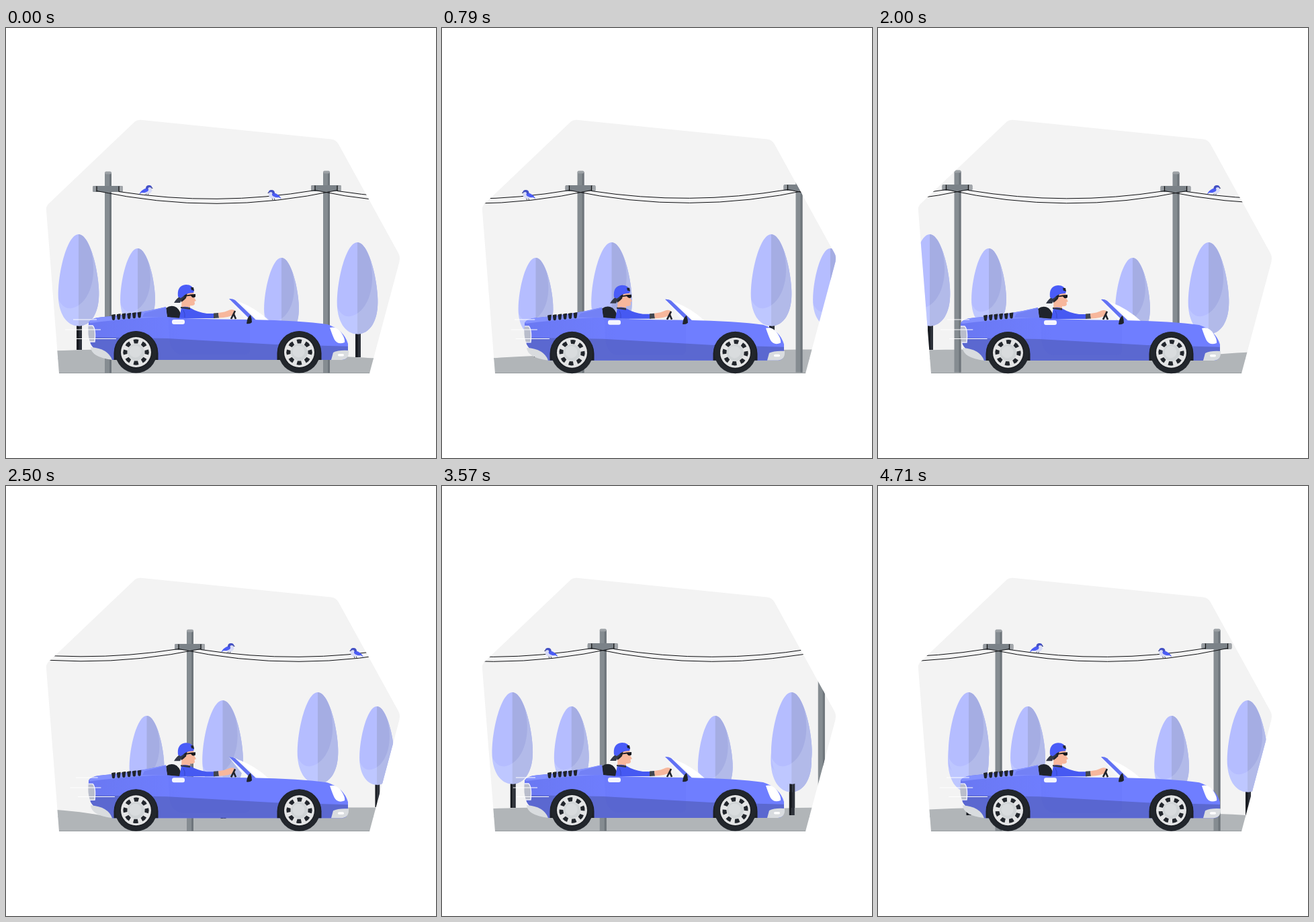
Write an HTML page with a canvas that moves like this. It is 640 px wide and 640 px high and loops after 4780 ms.

```html
<!DOCTYPE html>
<html lang="en">
<head>
<meta charset="utf-8">
<title>Country drive</title>
<style>
html, body { margin: 0; width: 100%; height: 100%; overflow: hidden; background: #fff }
canvas { display: block; width: 100vw; height: 100vh }
</style>
</head>
<body>
<canvas id="stage" width="640" height="640"></canvas>
<script>
const ctx = document.getElementById('stage').getContext('2d');
const LOOP = 4780, STEPS = 67;
const DARK = '#20242c';

// [step, scrolled distance]
const scrollKeys = [[0, 0], [11, 270.5], [21, 514], [35, 853], [43, 1043], [57, 1381.5], [66, 1597.5], [67, 1624.5]];
const groups = [0, 652.5, 1209, 1624.5];
const poleLift = [0, 1, 2, 0, 1, 0, 1];
const trees = [ // x, top, scale, trunk foot
  [523, 319, 1, 490], [108, 307, 1, 479], [196, 328, .855, 478], [410, 342, .855, 490]
];

const frame = new Path2D('M60 272Q59 265 64 261L190 141Q195 136 203 137L484 165.5Q491 166 495 173L584 335Q587 340 585.5 348L541 514H79Z');
const egg = new Path2D('M0 0C17 0 30.3 56 30.3 89C30.3 118 18 136.5 0 136.5C-18 136.5 -30.3 118 -30.3 89C-30.3 56 -17 0 0 0Z');
const eggLight = new Path2D('M14 10C33 60 16 105 -10 110C-20 112 -26 105 -31 95V138H31V10Z');
const hills = new Path2D('M-300 493C-190 484 -120 478.5 -10 478.5C60 478.5 120 482 172 493ZM145 493Q255 482 378 493Z');

function fill(shape, color) {
  ctx.fillStyle = color;
  ctx.fill(shape instanceof Path2D ? shape : new Path2D(shape));
}
function stroke(d, color, width = 1) {
  ctx.strokeStyle = color;
  ctx.lineWidth = width;
  ctx.stroke(new Path2D(d));
}
function rect(x, y, w, h, color) {
  ctx.fillStyle = color;
  ctx.fillRect(x, y, w, h);
}
function pill(x, y, w, h, r, color) {
  ctx.beginPath();
  ctx.roundRect(x, y, w, h, r);
  ctx.fillStyle = color;
  ctx.fill();
}
function disc(x, y, r, color) {
  ctx.beginPath();
  ctx.arc(x, y, r, 0, 7);
  ctx.fillStyle = color;
  ctx.fill();
}
function at(x, y, draw, sx = 1, sy = sx) {
  ctx.save();
  ctx.translate(x, y);
  ctx.scale(sx, sy);
  draw();
  ctx.restore();
}

function scrollAt(step) {
  const i = scrollKeys.findIndex(k => k[0] > step);
  const [s0, x0] = scrollKeys[i - 1], [s1, x1] = scrollKeys[i];
  return x0 + (x1 - x0) * (step - s0) / (s1 - s0);
}

function tree(x, top, scale, foot) {
  const trunkTop = top + 130 * scale, half = 4 * scale;
  rect(x - 3 * scale, trunkTop, half, foot - trunkTop, '#191c22');
  rect(x + scale, trunkTop, half, foot - trunkTop, '#2d3139');
  at(x, top, () => {
    fill(egg, '#b5bdff');
    ctx.clip(egg);
    rect(0, 0, 31, 138, '#a5ade3');
    fill(eggLight, 'rgba(224,230,255,.22)');
  }, scale);
}

function pole(x, y) {
  rect(x - 5, y - 24, 10, 299, '#858c91');
  rect(x + 2, y - 24, 3, 299, '#6e757b');
  pill(x - 5, y - 26, 10, 4, 2, '#9da2a6');
  pill(x - 23, y - 4.5, 45, 9, 2, '#7b8288');
  pill(x - 23, y - 4.5, 5, 9, 2, '#959a9f');
  pill(x + 17, y - 4.5, 5, 9, 2, '#a2a6aa');
  stroke(`M${x - 17} ${y - 4}v8M${x + 16} ${y - 4}v8`, '#111', 1.2);
}

function wire(x0, y0, x1, y1, sag) {
  const control = (y0 + y1) / 2 + 2 * sag;
  stroke(`M${x0} ${y0}Q${(x0 + x1) / 2} ${control} ${x1} ${y1}`, '#0c0d10', 1);
}

function wires([x0, y0], [x1, y1]) {
  wire(x0 + 16, y0 + 4, x1 - 17, y1 + 3, 11.8);
  wire(x0 - 17, y0 + 3, x1 + 16, y1 + 3, 19.3);
}

function bird(x, y, dir) {
  at(x, y, () => {
    stroke('M1 5L0 8M4 5L3 8', '#3b3f55', .9);
    fill('M-5 4L-2 -2L3 -5Q9 -6 9.5 -1Q9 6 2 6Z', '#d9dcf6');
    fill('M-10 6.5L-7 2Q-3 -2 3 -3Q6 1 1 3Q-3 5 -6 4Z', '#4b5cf5');
    fill('M0 -2Q0 -7 5 -7Q9 -7 9.5 -3L5 -4L2 -1Z', '#4350c4');
    fill('M8.5 -4L11 -2.5L8.5 -2Z', '#333a70');
  }, dir, 1);
}

function scenery(scroll) {
  ctx.save();
  fill(frame, '#f3f3f3');
  ctx.clip(frame);
  ctx.translate(-scroll, 0);
  rect(scroll, 491.5, 640, 23, '#b1b5b8');
  for (const g of groups) at(g + 185, 0, () => fill(hills, '#b1b5b8'));
  groups.forEach((g, i) => {
    for (const [x, top, scale, foot] of trees)
      tree(x + g, top, scale, foot + (i === 1 && top === 319 ? 5 : 0));
  });
  const poles = poleLift.map((lift, i) => [152 + 325 * i, 239.5 - lift]);
  poles.forEach(p => pole(...p));
  poles.slice(1).forEach((p, i) => wires(poles[i], p));
  for (const i of [0, 3, 5]) {
    const x = poles[i][0];
    bird(x + 56, 241, 1);
    bird(x + 248, 248, -1);
  }
  rect(scroll, 513.3, 640, .9, '#8d9296');
  ctx.restore();
}

function wheel(x, y, angle) {
  disc(x, y, 31, '#22262c');
  disc(x, y, 24, '#1a1d22');
  disc(x, y, 22.5, '#e3e4e5');
  at(x, y, () => {
    ctx.rotate(angle);
    for (let i = 0; i < 8; i++) {
      fill('M-4 -18.5Q0 -20 4 -18.5L2.6 -13H-2.6Z', '#22262c');
      ctx.rotate(Math.PI / 4);
    }
  });
  disc(x, y, 12.5, '#d0d4d6');
  disc(x - 1, y - 1, 9, '#d9dcde');
}

function driver() {
  fill('M238 417Q246 411 254 416Q261 422 261 432H240Z', DARK);
  fill('M262 394L279 391L280 401L283 406L280.5 407L281 411Q279 414 274 413V418H261Z', '#f7b79c');
  fill('M260 398L270 394L268 402L265 405L261 408Z', '#23252d');
  fill('M250 409Q254 402 262 397L266 400Q262 403 259 409Z', '#343947');
  fill('M256 400Q254 383 268 382Q278 382 280 391L279 394Q268 394 263 400L260 402Z', '#4a5cf8');
  fill('M275 386L279 386L280 391L276 390Z', DARK);
  fill('M267 398L275 396.5L282 396V400Q278 403 275 398.5L267 399.5Z', '#17191e');
  fill('M258 432L261 416Q267 413 275 417Q285 423 299 425L311 425V432Z', '#4659f2');
  fill('M260 415L274 416L274 419L260 417Z', '#343947');
  stroke('M264 420Q267 425 266 431', '#3748cb', 1);
  fill('M309 424.5L316 424L317 431.5L309 432Z', '#414650');
  fill('M316 424Q326 423 333 419.5Q338 418 341 421L341 426Q331 431 317 431.5Z', '#f7b79c');
  stroke('M341 421L335 433M339 426L342 433', DARK, 2.6);
}

function body() {
  const paint = ctx.createLinearGradient(123, 0, 260, 0);
  paint.addColorStop(0, '#6a78f2');
  paint.addColorStop(1, '#6f7eff');
  const hull = new Path2D('M123 438Q126 432 140 430.5Q193 426 238 415L240 430Q260 433 364 434Q440 435.5 478 441Q503 449 509 470V483Q509 494 500 494H158Q133 483 126 470Q122 453 123 438Z');
  fill('M332 403.5Q338 402 344 406L390 435H357Z', '#f6f7fb');
  fill('M346 407Q372 417 391 435L375 435Z', '#fff');
  fill('M332 403Q337 402.5 341 405L372 434.5H364Z', '#6272f4');
  fill(hull, paint);
  ctx.save();
  ctx.clip(hull);
  fill('M120 460L240 462L400 471L515 474V495H120Z', '#5b68d0');
  fill('M123 438Q126 432 140 430.5Q193 426 238 415L239 430Q190 431 126 439Z', '#8391ff');
  fill('M206 424L238 416L239 430H203Z', '#7381f5');
  fill('M242 432H363V478Q363 486 354 486H262Q246 485 243 462Z', 'rgba(60,72,205,.05)');
  ctx.restore();
  for (let i = 0; i < 6; i++)
    at(157 + 7.7 * i, 427 - .7 * i, () => fill('M0 0Q3 -1 6 -1L5 7Q3 9 1 7Z', DARK));
  fill('M123 443H129Q133 448 132 467H125Q121 456 123 443Z', '#b9bdcb');
  stroke('M123 443H129Q134 448 132 467H125', '#f3f4ff', 1.4);
  fill('M126 475Q152 477 158 494Q127 490 126 475Z', '#d9dcdf');
  pill(247, 434, 19, 7, 3, '#f4f5ff');
  fill('M358 440Q359 430 364 427Q366 433 366 438Q363 441 358 440Z', DARK);
  fill('M482 446Q493 443 500 455Q505 463 504 468Q494 472 489 464Q486 458 482 446Z', '#fff');
  fill('M484 494L487 483Q495 479 510 480Q511 493 500 494Z', '#d9dcdf');
  pill(494, 485, 9, 3.5, 1.7, '#fff');
}

function speedLines(s) {
  stroke(`M${100 + 10 * s} 434H${135 + 4 * s}M${88 + 18 * s} 449H${141 + s}M${104 + 7 * s} 462.5H${164 - 5 * s}`, '#fff', 1.2);
}

function wave(step, cycles) {
  return .5 - .5 * Math.cos(2 * Math.PI * cycles * step / STEPS);
}

function render(now) {
  // The picture advances in even steps; the small lead keeps step edges stable.
  const step = Math.floor(now % LOOP / LOOP * STEPS + .1) % STEPS;
  const scroll = scrollAt(step), bob = 1.2 * wave(step, 8);
  ctx.clearRect(0, 0, 640, 640);
  scenery(scroll);
  at(0, bob, () => {
    driver();
    body();
    for (const x of [193.5, 436.5])
      at(x, 494, () => fill('M-33 0V-10A33 33 0 0 1 33 -10V0Z', '#1c1f25'));
  });
  for (const x of [193.5, 436.5]) wheel(x, 482.5 + .8 * bob, scroll / 31);
  speedLines(wave(step, 10));
  requestAnimationFrame(render);
}
requestAnimationFrame(render);
</script>
</body>
</html>
```
